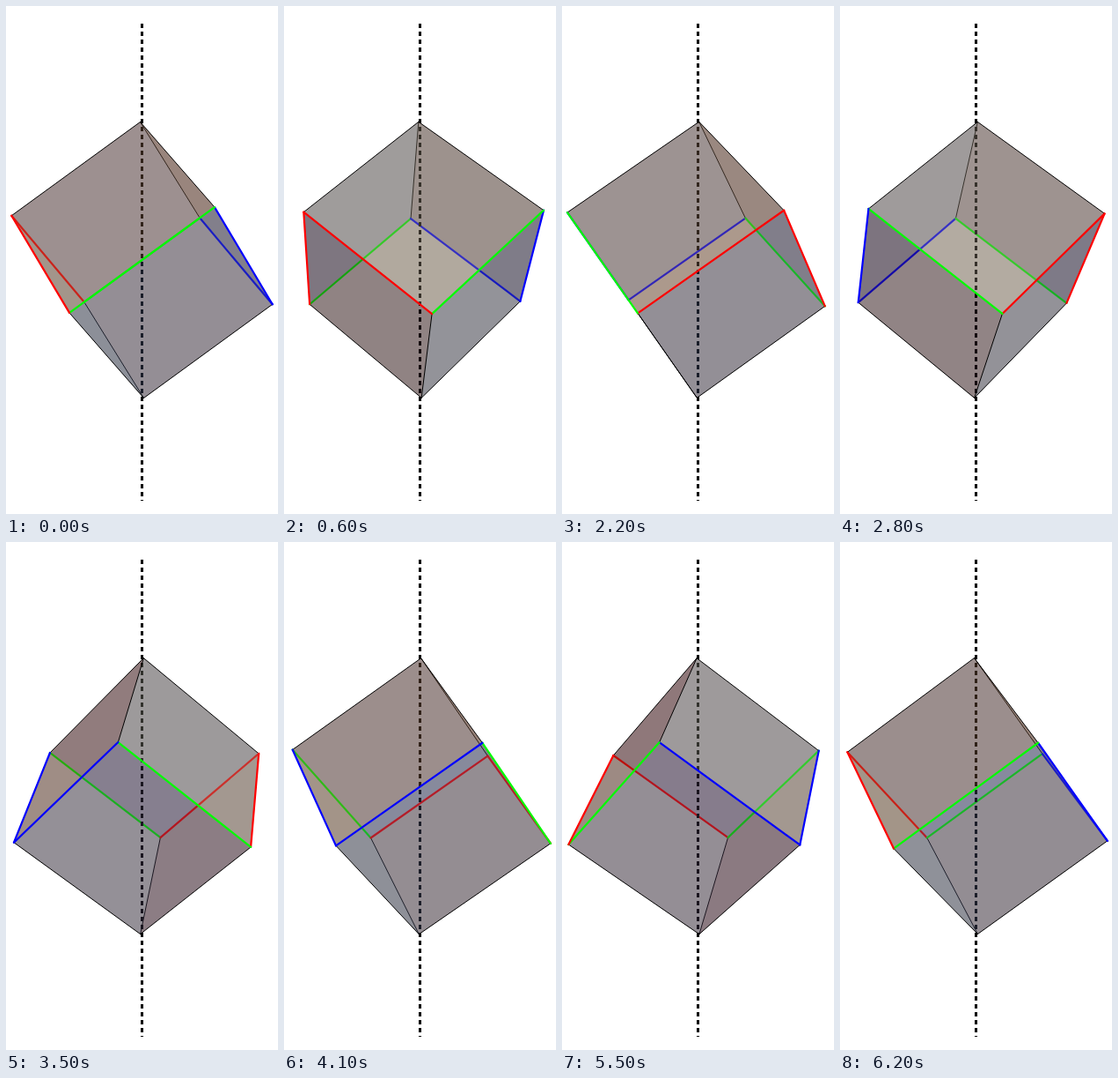
These frames come from a looping animation (309x576 px, 6.3 s). An HTML page:

```html
<!DOCTYPE html>
<html lang="en">
<head>
<meta charset="utf-8">
<title>Cube turning on its diagonal</title>
<style>
  html, body { margin: 0; width: 100%; height: 100%; overflow: hidden; background: #fff; }
  svg { display: block; width: 309px; height: 576px; }
  line { stroke-linecap: round; }
</style>
</head>
<body>
<svg viewBox="0 0 309 576">
  <g id="back"></g>
  <path d="M154.5 20V561" stroke="#000" stroke-width="3" stroke-dasharray="5 4"/>
  <g id="front"></g>
</svg>
<script>
const CX = 154.5, CY = 288, EYE = 1126;
const HALF = 156.5;                  // half of the body diagonal
const RADIUS = HALF * Math.sqrt(8) / 3;
const TILT = Math.PI / 5 - Math.atan(Math.SQRT1_2);
const STEP = 100, STEPS = 63, TURN = 0.1;
const OPACITY = 0.4, GREY = 0.5;
const TOP = 6, BOTTOM = 7;

const AMBIENT = [0.4, 0.2, 0.2];
const LIGHTS = [
  { dir: [2, 0, 2], rgb: [0, 0.18, 0.5] },
  { dir: [2, 2, 3], rgb: [0.18, 0.5, 0.18] },
  { dir: [0, 2, 2], rgb: [0.5, 0.18, 0] },
  { dir: [0, 0, 1], rgb: [0, 0, 0.18] }
];

const dot = (a, b) => a[0] * b[0] + a[1] * b[1] + a[2] * b[2];
const unit = v => v.map(c => c / Math.hypot(...v));
LIGHTS.forEach(l => { l.dir = unit(l.dir); });

const groups = ["back", "front"].map(id => document.getElementById(id));
const make = (tag, attrs) => {
  const el = document.createElementNS("http://www.w3.org/2000/svg", tag);
  set(el, attrs);
  return el;
};
function set(el, attrs) {
  for (const k in attrs) el.setAttribute(k, attrs[k]);
}

// Ring corners 0..5 zigzag around the axis, then the two poles.
const ring = [0, 1, 2, 3, 4, 5];
const corners = ring.map(i => {
  const a = i * Math.PI / 3;
  return [RADIUS * Math.cos(a), (i % 2 ? 1 : -1) * HALF / 3, RADIUS * Math.sin(a)];
});
corners.push([0, HALF, 0], [0, -HALF, 0]);

const faces = ring.map(i => ({
  ids: [i % 2 ? BOTTOM : TOP, (i + 5) % 6, i, (i + 1) % 6],
  el: make("polygon", { "fill-opacity": OPACITY })
}));

const addEdge = (a, b, sides, stroke, width) =>
  ({ a, b, sides, el: make("line", { stroke, "stroke-width": width }) });
const ringColours = ["#00f", "#0f0", "#f00", "#f00", "#0f0", "#00f"];
const edges = [
  ...ring.map(i => addEdge(i, i % 2 ? TOP : BOTTOM, [(i + 5) % 6, (i + 1) % 6], "#000", 1)),
  ...ring.map(i => addEdge(i, (i + 1) % 6, [i, (i + 1) % 6], ringColours[i], 2.2))
];

function turn([x, y, z], angle) {
  const ct = Math.cos(TILT), st = Math.sin(TILT);
  const c = Math.cos(angle), s = Math.sin(angle);
  const u = x * ct - y * st;
  return [u * c + z * s, x * st + y * ct, z * c - u * s];
}

function project([x, y, z]) {
  const k = EYE / (EYE - z);
  return [(CX + x * k).toFixed(2), (CY - y * k).toFixed(2)];
}

function shade(normal) {
  const rgb = AMBIENT.map((base, i) => LIGHTS.reduce(
    (sum, l) => sum + l.rgb[i] * Math.max(0, dot(l.dir, normal)), base));
  return `rgb(${rgb.map(c => Math.round(c * GREY * 255)).join()})`;
}

function draw(angle) {
  const solid = corners.map(p => turn(p, angle));
  const flat = solid.map(project);

  const facing = faces.map(({ ids, el }) => {
    const mid = [0, 1, 2].map(k => ids.reduce((s, id) => s + solid[id][k], 0) / 4);
    const normal = unit(mid);
    const near = dot(normal, [-mid[0], -mid[1], EYE - mid[2]]) > 0;
    set(el, {
      points: ids.map(id => flat[id].join()).join(" "),
      fill: shade(near ? normal : normal.map(c => -c))
    });
    groups[+near].append(el);
    return near;
  });

  for (const { a, b, sides, el } of edges) {
    const [x1, y1] = flat[a], [x2, y2] = flat[b];
    set(el, { x1, y1, x2, y2 });
    groups[+sides.some(i => facing[i])].append(el);
  }
}

let start, shown = -1;
function tick(now) {
  if (start === undefined) start = now;
  const step = Math.floor(Math.max(0, now - start) / STEP) % STEPS;
  if (step !== shown) {
    shown = step;
    draw(step * TURN);
  }
  requestAnimationFrame(tick);
}
draw(0);
requestAnimationFrame(tick);
</script>
</body>
</html>
```
